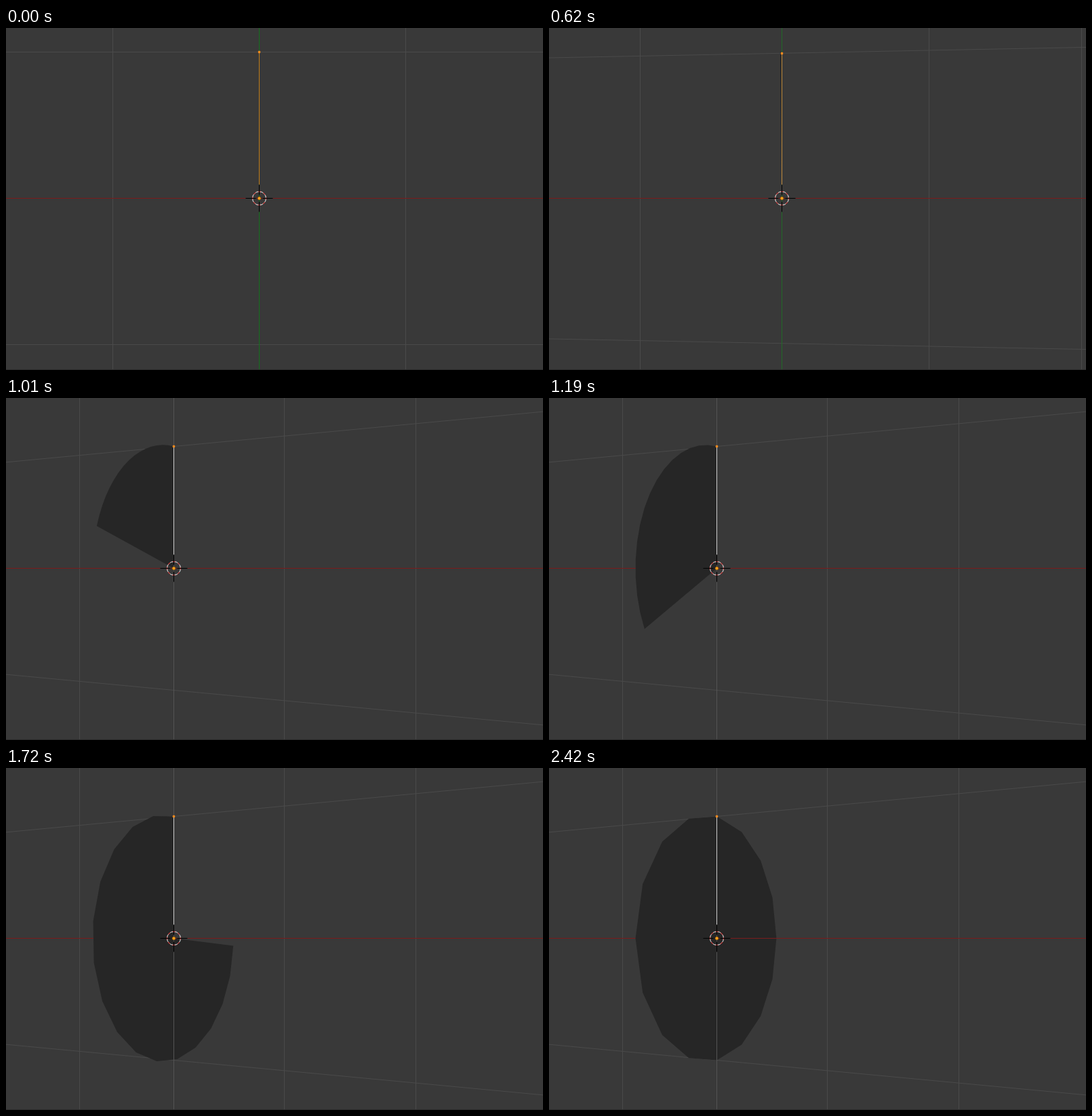
Recreate the animation shown at these times as an HTML page. Size 792 by 505 pixels, loop 2.96 s.

```html
<!DOCTYPE html>
<html lang="en">
<head>
<meta charset="utf-8">
<title>Spin around an axis</title>
<style>
  html, body { margin: 0; width: 100%; height: 100%; overflow: hidden; background: #393939; }
  svg { display: block; }
</style>
</head>
<body>
<svg width="792" height="505" viewBox="0 0 792 505">
  <defs>
    <clipPath id="nearClip"><rect id="nearBox" y="0" height="505"/></clipPath>
    <clipPath id="farClip"><rect id="farBox" y="0" width="792" height="505"/></clipPath>
  </defs>
  <rect width="792" height="505" fill="#393939"/>
  <g clip-path="url(#farClip)"><path id="far" fill="#262626"/></g>
  <path id="grid" fill="none" stroke="#4a4a4a"/>
  <path id="axisV"/>
  <path d="M0 251.5H792" stroke="#7a1c1c"/>
  <g clip-path="url(#nearClip)"><path id="near" fill="#262626"/></g>
  <path id="edge"/>
  <rect id="tip" width="3.4" height="3.4" rx="1" fill="#f58a1f"/>
  <g id="cursor" fill="none">
    <circle r="10" stroke="#fff"/>
    <circle r="10" stroke="#f01818" stroke-dasharray="3.927" stroke-dashoffset="2"/>
    <path d="M-20 0H-5M5 0H20M0-20V-5M0 5V20" stroke="#000"/>
    <circle r="2.5" fill="#ffa01c" stroke="#3a2608" stroke-width=".5"/>
  </g>
  <rect y="504" width="792" height="1" fill="#2c2c2c"/>
</svg>
<script>
const LOOP = 2960, CX = 374, CY = 251, FOCAL = 1040, TURN = 27.06 * Math.PI / 180, STEPS = 16;

// moments at which the held picture changes
const TICKS = [0, 450, 530, 630, 730, 830, 920, 1010, 1100, 1190, 1280, 1370, 1460,
  1540, 1630, 1720, 1800, 1890, 1980, 2070, 2160, 2240, 2330, 2420];

// sweep of the disk: time, degrees
const SWEEP = [[400, 0], [830, 40], [1190, 115.3], [1720, 266], [2070, 338], [2420, 360]];

const el = id => document.getElementById(id);
const set = (id, attrs) => { for (const k in attrs) el(id).setAttribute(k, attrs[k]); };
const px = v => Math.round(v) + 0.5;
const mix = (a, b, p) => `rgb(${a.map((v, i) => Math.round(v + (b[i] - v) * p))})`;

function smooth(t, start, span) {
  const u = Math.min(1, Math.max(0, (t - start) / span));
  return u * u * (3 - 2 * u);
}

function slope(i) {
  const a = SWEEP[i - 1], b = SWEEP[i + 1];
  return a && b ? (b[1] - a[1]) / (b[0] - a[0]) : 0;
}

function sweepAt(t) {
  if (t <= SWEEP[0][0]) return 0;
  const i = SWEEP.findIndex(k => k[0] >= t);
  if (i < 0) return 360;
  const [t0, a] = SWEEP[i - 1], [t1, b] = SWEEP[i];
  const h = t1 - t0, u = (t - t0) / h, v = 1 - u;
  return a * v * v * (1 + 2 * u) + b * u * u * (3 - 2 * u)
    + h * u * v * (v * slope(i - 1) - u * slope(i));
}

function camera(p) {
  const th = TURN * p, c = Math.cos(th), s = Math.sin(th);
  const pull = (1 - c) / (1 - Math.cos(TURN));
  const depth = 4.815 + 0.963 * pull, shift = -0.0046 - 0.701 * p;
  return (x, y, z) => {
    const k = FOCAL / (depth - x * s + y * c);
    return [CX + k * (shift + x * c + y * s), CY - k * z];
  };
}

function draw(time) {
  const t = TICKS.filter(v => v <= time).pop();
  const p = smooth(t, 409, 420);
  const view = camera(p);
  const at = (...v) => view(...v).map(n => (n + 0.5).toFixed(2)).join(' ');
  const u0 = px(view(0, 0, 0)[0]), top = px(view(0, 0, 1)[1]);

  let grid = '';
  for (const x of [-3, -2, -1, 1, 2, 3, 4]) grid += `M${px(view(x, 0, 0)[0])} 0V505`;
  for (const z of [-1, 1]) grid += `M${at(-5, 0, z)}L${at(5, 0, z)}`;
  set('grid', { d: grid });
  set('axisV', { d: `M${u0} 0V505`, stroke: mix([20, 112, 28], [84, 84, 84], p) });

  const sweep = sweepAt(t) * Math.PI / 180;
  let disk = '';
  if (sweep > 0) {
    disk = `M${at(0, 0, 0)}`;
    for (let i = 0; i <= STEPS; i++) {
      const a = sweep * i / STEPS;
      disk += `L${at(0, -Math.sin(a), Math.cos(a))}`;
    }
    disk += 'Z';
  }
  set('near', { d: disk });
  set('far', { d: disk });
  set('nearBox', { width: u0 - 0.5 });
  set('farBox', { x: u0 - 0.5 });

  set('edge', { d: `M${u0} ${top}V231.5`, stroke: mix([190, 124, 26], [205, 205, 205], p) });
  set('tip', { x: u0 - 1.7, y: top - 1.7 });
  set('cursor', { transform: `translate(${u0} ${CY + 0.5})` });
}

const begin = performance.now();
function tick() {
  draw((performance.now() - begin) % LOOP);
  requestAnimationFrame(tick);
}
tick();
</script>
</body>
</html>
```
